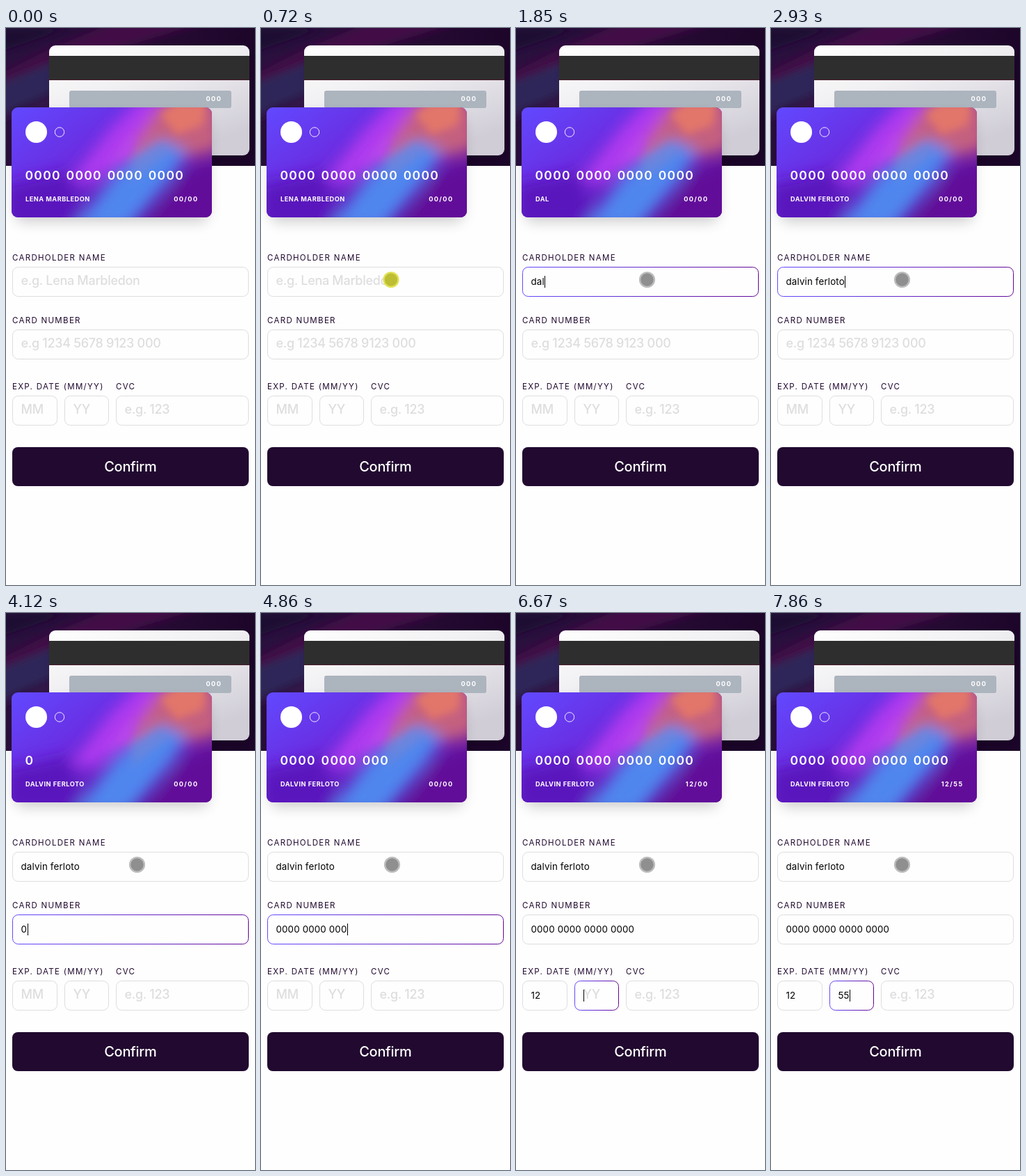
Write an HTML page that moves like this. It is 358 px wide and 800 px high and loops after 8 s.

```html
<!DOCTYPE html>
<html lang="en">
<head>
<meta charset="utf-8">
<title>Card form</title>
<style>
  html, body { margin: 0; width: 100%; height: 100%; overflow: hidden; background: #fefefe; }
  svg { display: block; width: 100%; height: 100%; font-family: Inter, "Open Sans", sans-serif; }
  text { white-space: pre; }
  .label { font-size: 11.5px; letter-spacing: 1.3px; fill: #21092f; }
  .hint { font-size: 18px; font-weight: 500; letter-spacing: -.3px; fill: #dedddf; }
  .value { font-size: 13.33px; letter-spacing: .15px; fill: #000; }
  .small { font-size: 9.2px; font-weight: 700; letter-spacing: .5px; fill: #fff; }
  .digits { font-size: 17.5px; font-weight: 600; letter-spacing: 1.3px; word-spacing: 2px; fill: #fff; }
  .wide { letter-spacing: 1.4px; }
  .box { fill: #fefefe; stroke: #dedddf; }
</style>
</head>
<body>
<svg viewBox="0 0 358 800" xmlns="http://www.w3.org/2000/svg">
  <defs>
    <linearGradient id="focus"><stop stop-color="#6348fe"/><stop offset="1" stop-color="#610595"/></linearGradient>
    <linearGradient id="front" x1="0" y1="0" x2="1" y2=".8">
      <stop stop-color="#6149ff"/><stop offset=".4" stop-color="#6a2ee2"/>
      <stop offset=".75" stop-color="#6515b4"/><stop offset="1" stop-color="#5c0490"/>
    </linearGradient>
    <linearGradient id="back" x1="0" y1="0" x2=".6" y2="1">
      <stop stop-color="#fff"/><stop offset=".4" stop-color="#f1f0f2"/><stop offset="1" stop-color="#d0cdd7"/>
    </linearGradient>
    <linearGradient id="night" x1="0" y1="0" x2="1" y2=".3">
      <stop stop-color="#2b1140"/><stop offset=".6" stop-color="#260a33"/><stop offset="1" stop-color="#1b0528"/>
    </linearGradient>
    <clipPath id="head"><rect width="358" height="198"/></clipPath>
    <clipPath id="face"><rect x="8" y="114" width="288" height="158" rx="9"/></clipPath>
    <filter id="soft" x="-50%" y="-50%" width="200%" height="200%"><feGaussianBlur stdDeviation="11"/></filter>
    <filter id="haze" x="-50%" y="-50%" width="200%" height="200%"><feGaussianBlur stdDeviation="6"/></filter>
    <filter id="shade" x="-20%" y="-20%" width="140%" height="150%"><feGaussianBlur stdDeviation="10"/></filter>
  </defs>

  <rect width="358" height="800" fill="#fefefe"/>
  <g clip-path="url(#head)">
    <rect width="358" height="198" fill="url(#night)"/>
    <g filter="url(#haze)">
      <path d="M-20 0H90L-20 38Z" fill="#1f0a30"/>
      <path d="M-20 72L60 32L160 -10H290L160 30L60 66L-20 104Z" fill="#431146"/>
      <path d="M-20 84L70 48V92L-20 130Z" fill="#2d2859"/>
      <path d="M-20 140L70 96V120H-20Z" fill="#35154c"/>
    </g>
  </g>

  <rect x="66" y="34" width="280" height="152" rx="9" fill="#000" opacity=".16" filter="url(#haze)" clip-path="url(#head)"/>
  <rect x="62" y="25" width="288" height="158" rx="9" fill="url(#back)"/>
  <path d="M62 40H350V74H62Z" fill="#2e2e2e"/>
  <path d="M62 74H350V75H62Z" fill="#4c1c2c"/>
  <rect x="91" y="90" width="233" height="25" rx="3" fill="#acb4be"/>
  <text class="small wide" x="287.5" y="105">000</text>

  <rect x="14" y="128" width="276" height="150" rx="9" fill="#000" opacity=".2" filter="url(#shade)"/>
  <g clip-path="url(#face)">
    <rect x="8" y="114" width="288" height="158" fill="url(#front)"/>
    <g filter="url(#soft)">
      <path d="M0 225L90 205L120 290H0Z" fill="#5a17bd"/>
      <path d="M92 218L150 145L195 100H250L185 178L125 222Z" fill="#b03bf0"/>
      <path d="M172 186L225 105H310V175L245 190Z" fill="#c5617f"/>
      <path d="M95 290L160 205L225 160L262 178L238 215L175 290Z" fill="#4f86ee"/>
      <path d="M205 290L250 218L310 190V290Z" fill="#62079a"/>
    </g>
    <g filter="url(#haze)">
      <path d="M222 124L245 106H290L282 140L245 153Z" fill="#e2766b"/>
      <path d="M143 197L185 152L178 180Z" fill="#b944ee"/>
      <path d="M182 190L225 166L232 182L180 222Z" fill="#6c86dc" opacity=".7"/>
    </g>
  </g>
  <circle cx="43.5" cy="149.5" r="15.5" fill="#fff"/>
  <circle cx="77" cy="149.5" r="6.7" fill="none" stroke="#fff" stroke-width=".9"/>
  <text class="digits" id="cardNumber" x="27.5" y="218"/>
  <text class="small" id="cardName" x="28" y="249"/>
  <text class="small wide" id="cardDate" x="276.5" y="249" text-anchor="end"/>

  <g id="form"/>
  <rect x="9" y="602" width="340" height="56" rx="8" fill="#21092f"/>
  <text x="178.8" y="637" text-anchor="middle" font-size="20" font-weight="500" letter-spacing="-.3" fill="#fff">Confirm</text>
  <rect id="caret" width="1" height="17"/>
  <g id="touch">
    <circle id="ring" r="11.6"/>
    <circle id="core" r="9.2"/>
  </g>
</svg>
<script>
const LOOP = 8000;
const $ = id => document.getElementById(id);

function add(tag, attrs, text = "") {
  const el = document.createElementNS("http://www.w3.org/2000/svg", tag);
  for (const k in attrs) el.setAttribute(k, attrs[k]);
  el.textContent = text;
  $("form").append(el);
  return el;
}

const label = (x, y, text) => add("text", { class: "label", x, y }, text);
label(9, 334, "CARDHOLDER NAME");
label(9, 424, "CARD NUMBER");
label(9, 519, "EXP. DATE (MM/YY)");
label(158, 519, "CVC");

// Evenly spaced key times, both ends included
const spread = (from, to, n) =>
  Array.from({ length: n }, (_, i) => from + (to - from) * i / (n - 1));

function field(x, y, w, hint, focusAt = Infinity, keys = [], read = () => "") {
  const box = add("rect", { class: "box", x: x + .5, y: y + .5, width: w - 1, height: 42, rx: 8 });
  const at = { x: x + 12.5, y: y + 26 };
  return {
    x, y, focusAt, keys, read, box,
    hint: add("text", { class: "hint", ...at }, hint),
    value: add("text", { class: "value", ...at })
  };
}

const group = n => "0".repeat(n).replace(/(.{4})(?=.)/g, "$1 ");
const nameKeys = [1450, 1650, 1850, ...spread(1920, 2320, 5), ...spread(2520, 2930, 6)];
const numberKeys = [4120, ...spread(4580, 5070, 8)];

const name = field(9, 343, 340, "e.g. Lena Marbledon", 990, nameKeys, n => "dalvin ferloto".slice(0, n));
const number = field(9, 433, 340, "e.g 1234 5678 9123 000", 3130, numberKeys,
  n => group(Math.min(16, Math.max(n, 2 * n - 1))));
const month = field(9, 528, 65, "MM", 5340, [6330, 6400], n => "12".slice(0, n));
const year = field(84, 528, 64, "YY", 6670, [7660, 7730], n => "55".slice(0, n));
const fields = [name, number, month, year, field(158, 528, 191, "e.g. 123")];

function drawTouch(t) {
  const p = Math.min(1, Math.max(0, (t - 390) / 270));
  const ease = 1 - (1 - p) ** 2;
  const x = t < 850 ? 193 - 6 * ease : 188.5;
  const y = 386 - 24.5 * ease;
  const pressed = t >= 650 && t < 920;
  $("touch").setAttribute("transform", `translate(${x} ${y})`);
  $("touch").setAttribute("visibility", t < 390 ? "hidden" : "visible");
  $("ring").setAttribute("fill", pressed ? "rgba(222,222,70,.9)" : "#bdbdbd");
  $("core").setAttribute("fill", pressed ? "rgba(178,178,40,.75)" : "#8f8f8f");
}

function drawCaret(active, t) {
  let shown = false;
  if (active) {
    const last = Math.max(active.focusAt, ...active.keys.filter(k => k <= t));
    shown = (t - last) % 990 < 460;
    const width = active.value.textContent ? active.value.getComputedTextLength() : 0;
    $("caret").setAttribute("x", Math.round(active.x + 13 + width));
    $("caret").setAttribute("y", active.y + 13);
  }
  $("caret").setAttribute("visibility", shown ? "visible" : "hidden");
}

function draw(t) {
  const active = fields.filter(f => f.focusAt <= t).pop();
  for (const f of fields) {
    f.text = f.read(f.keys.filter(k => k <= t).length);
    f.value.textContent = f.text;
    f.hint.setAttribute("visibility", f.text ? "hidden" : "visible");
    f.box.style.stroke = f === active ? "url(#focus)" : "";
  }
  $("cardName").textContent = (name.text || "Lena Marbledon").toUpperCase();
  $("cardNumber").textContent = number.text || group(16);
  $("cardDate").textContent = `${month.text || "00"}/${year.text || "00"}`;
  drawCaret(active, t);
  drawTouch(t);
}

const start = performance.now();
function tick() {
  draw((performance.now() - start) % LOOP);
  requestAnimationFrame(tick);
}
tick();
</script>
</body>
</html>
```
